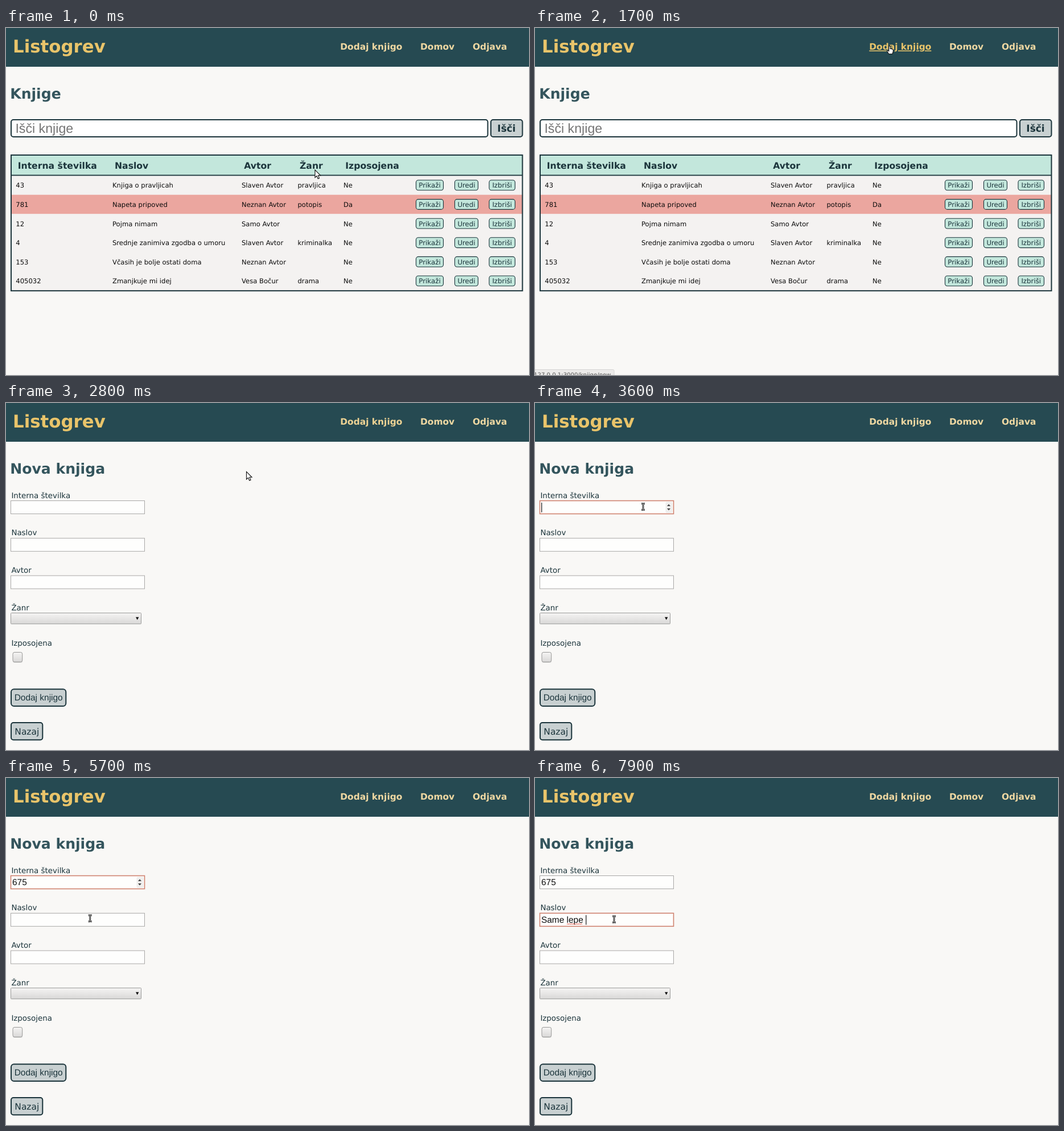
Recreate the animation shown at these times as an HTML page. Size 919 by 609 pixels, loop 8 s.

```html
<!DOCTYPE html>
<html lang="sl">
<head>
<meta charset="utf-8">
<title>Knjige</title>
<style>
  html, body { margin: 0; width: 100%; height: 100%; overflow: hidden; background: #f9f8f6; }
  svg { display: block; }
  text { font-family: "DejaVu Sans", sans-serif; fill: #1b343b; white-space: pre; text-rendering: geometricPrecision; }
  .bold { font-weight: bold; }
  .sans { font-family: "Liberation Sans", Arial, sans-serif; }
  .mid { text-anchor: middle; }
</style>
</head>
<body>
<svg id="stage" width="919" height="609" viewBox="0 0 919 609">
  <defs>
    <linearGradient id="grey" x2="0" y2="1">
      <stop stop-color="#f5f4f3"/><stop offset="1" stop-color="#d9d8d7"/>
    </linearGradient>
  </defs>
</svg>
<script>
const INK = '#1b343b', MINT = '#c3e7dc', STEEL = '#c8d0d1';
const LOOP = 8000, STEP = 100;

const text = (x, y, size, str, attrs = '') =>
  `<text x="${x}" y="${y}" font-size="${size}" ${attrs}>${str}</text>`;
const rect = (x, y, x2, y2, attrs) =>
  `<rect x="${x}" y="${y}" width="${x2 - x}" height="${y2 - y}" ${attrs}/>`;
const framed = (fill, width = 2, r = 4) =>
  `fill="${fill}" stroke="${INK}" stroke-width="${width}" rx="${r}"`;

const banner = () =>
  rect(0, 0, 919, 68, 'fill="#264a52"') +
  text(12, 43, 30.85, 'Listogrev', 'class="bold" style="fill:#e9c46a"') +
  [[587.3, 'Dodaj knjigo', 'id="link"'], [728, 'Domov'], [820, 'Odjava']].map(([x, s, id = '']) =>
    text(x, 38.4, 15.45, s, `class="bold" style="fill:#efd8a2" ${id}`)).join('');

const books = [
  ['43', 'Knjiga o pravljicah', 'Slaven Avtor', 'pravljica', 'Ne'],
  ['781', 'Napeta pripoved', 'Neznan Avtor', 'potopis', 'Da'],
  ['12', 'Pojma nimam', 'Samo Avtor', '', 'Ne'],
  ['4', 'Srednje zanimiva zgodba o umoru', 'Slaven Avtor', 'kriminalka', 'Ne'],
  ['153', 'Včasih je bolje ostati doma', 'Neznan Avtor', '', 'Ne'],
  ['405032', 'Zmanjkuje mi idej', 'Vesa Bočur', 'drama', 'Ne']
];
const columns = [17.3, 187, 414, 512.5, 593];
const headings = [[20.7, 'Interna številka'], [191, 'Naslov'], [418.3, 'Avtor'], [516, 'Žanr'], [596.3, 'Izposojena']];
const actions = [[720.5, 768.5, 'Prikaži'], [788.5, 829.5, 'Uredi'], [849, 894.5, 'Izbriši']];

const bookRow = (cells, i) => {
  const y = 280.3 + 33.6 * i;
  return cells.map((s, c) => text(columns[c], y, 11.6, s, 'style="fill:#0c0c0c"')).join('') +
    actions.map(([x, x2, s]) => rect(x, y - 13.3, x2, y + 4.5, framed(MINT, 1.1)) +
      text((x + x2) / 2, y, 11.8, s, 'class="mid"')).join('');
};

const listPage = () =>
  text(7.2, 124.4, 25.1, 'Knjige', 'class="bold" style="fill:#34555d"') +
  rect(9, 161, 846.5, 191, framed('#fff')) +
  text(16.4, 184, 23.2, 'Išči knjige', 'class="sans" style="fill:#757575"') +
  rect(852, 161, 907.5, 191, framed(STEEL)) +
  text(879.5, 182.3, 17, 'Išči', 'class="bold mid"') +
  rect(9, 223, 907.5, 461, `fill="#f4f2f1"`) +
  rect(9, 223, 907.5, 258, `fill="${MINT}"`) +
  rect(9, 292.7, 907.5, 326.2, 'fill="#eba69f"') +
  rect(9, 257.6, 907.5, 259.4, `fill="${INK}"`) +
  rect(9, 223, 907.5, 461.2, framed('none', 2, 0)) +
  headings.map(([x, s]) => text(x, 247, 15.65, s, 'class="bold"')).join('') +
  books.map(bookRow).join('');

const field = (id, y) => rect(8.5, y, 243.5, y + 23, `id="${id}" fill="#fefefd"`);

const formPage = () =>
  text(7.2, 124.4, 25.1, 'Nova knjiga', 'class="bold" style="fill:#34555d"') +
  [[166.5, 'Interna številka'], [232.2, 'Naslov'], [298, 'Avtor'], [363.8, 'Žanr'], [425.8, 'Izposojena']]
    .map(([y, s]) => text(9.4, y, 13.4, s)).join('') +
  field('number', 171.5) + field('title', 237.3) + field('author', 303) +
  `<g id="spinner">${rect(229.5, 173.5, 241.5, 193, 'fill="#f0efee" rx="2"')}
    <path d="M232 181l3-3.4 3 3.4zM232 185l3 3.4 3-3.4z" fill="#444"/></g>` +
  text(11, 188.3, 15.43, '', 'id="numberText" class="sans" style="fill:#111"') +
  text(11, 254, 15.43, '', 'id="titleText" class="sans" style="fill:#111"') +
  `<path id="squiggle" d="M56 257${'l1.5-1.5 1.5 1.5'.repeat(9)}" fill="none" stroke="#e0402f"/>` +
  rect(0, 0, 1.1, 17, 'id="caret"') +
  rect(8.5, 368.5, 237.5, 387.7, 'fill="url(#grey)" stroke="#9b9b9a" rx="1"') +
  '<path d="M228 375.8h5.4l-2.7 5z" fill="#111"/>' +
  rect(12, 438.5, 29, 456, 'fill="#dcdbda" rx="3"') +
  rect(12, 437.5, 28.7, 454.5, 'fill="url(#grey)" stroke="#989897" rx="3"') +
  rect(9, 502.2, 105.3, 532, framed(STEEL, 2, 5)) +
  text(57.2, 522, 15.45, 'Dodaj knjigo', 'class="sans mid"') +
  rect(9, 561, 64.3, 591.3, framed(STEEL)) +
  text(36.8, 582.3, 15.45, 'Nazaj', 'class="mid"');

const cursors = {
  arrow: '<path d="M0 0V13.5L3 10.7 5.2 15.6 7.5 14.6 5.4 9.8H9.6Z" fill="#fff" stroke="#111" stroke-width="1.1"/>',
  hand: `<path d="M-1.2 .6Q0-.8 1.2 .6V5Q5.8 5 6.3 7V10L5 14H-1.4L-4.2 9.4Q-4.6 7.4-2.6 8.2L-1.2 9.4Z"
    fill="#fff" stroke="#111" stroke-width="1.1" stroke-linejoin="round"/>`,
  beam: ['#222" stroke-width="2.8', '#ddd" stroke-width=".8'].map(s =>
    `<path d="M-3-5.5Q0-5.5 0-4Q0-5.5 3-5.5M0-4V4M-3 5.5Q0 5.5 0 4Q0 5.5 3 5.5" fill="none" stroke="${s}"/>`).join('')
};

const stage = document.getElementById('stage');
stage.insertAdjacentHTML('beforeend',
  banner() +
  `<g id="list">${listPage()}</g><g id="form">${formPage()}</g>` +
  `<g id="status">${rect(-5, 599.5, 139, 615, 'fill="#ecebea" stroke="#d6d5d4" rx="2"')}
    ${text(133.5, 612, 10.1, '127.0.0.1:3000/knjige/new', 'text-anchor="end" style="fill:#555"')}</g>` +
  Object.entries(cursors).map(([id, shape]) => `<g id="${id}">${shape}</g>`).join(''));

const el = id => document.getElementById(id);
const show = (id, on) => el(id).style.display = on ? '' : 'none';
const clamp = v => Math.max(0, Math.min(1, v));

// Pointer waypoints: time, x, y
const path = [
  [0, 543, 249], [300, 543, 249], [500, 543, 242], [600, 543, 241], [900, 596, 121], [1000, 596, 121],
  [1400, 622, 34], [1700, 623, 31.5], [2400, 623, 31.5], [2700, 500, 100], [3100, 190, 182],
  [5000, 190, 182], [5100, 195, 190], [5200, 196, 212], [5300, 174, 241], [5400, 174, 241],
  [5800, 139, 248], [LOOP, 139, 248]
];
function pointer(t) {
  const i = path.findIndex(p => p[0] > t);
  const [t0, x0, y0] = path[i - 1], [t1, x1, y1] = path[i];
  const k = (t - t0) / (t1 - t0);
  return [x0 + (x1 - x0) * k, y0 + (y1 - y0) * k];
}

function hoverAmount(t) {
  if (t < 2100) return clamp((t - 1300) / 400);
  if (t < 2600) return clamp((t - 2020) / 250);
  return clamp(1 - (t - 2500) / 400);
}

function styleField(id, focused) {
  el(id).setAttribute('stroke', focused ? '#cf8270' : '#a9a8a7');
  el(id).setAttribute('stroke-width', focused ? 1.6 : 1);
}

function draw(t) {
  const onForm = t >= 2100;
  show('list', !onForm);
  show('form', onForm);

  const hovered = t >= 1400 && t < 2600;
  const h = hoverAmount(t);
  const mix = (a, b) => Math.round(a + (b - a) * h);
  el('link').style.fill = `rgb(${mix(239, 233)},${mix(216, 196)},${mix(162, 106)})`;
  el('link').style.textDecoration = hovered ? 'underline' : 'none';
  show('status', t >= 1500 && t < 2700);

  const [x, y] = pointer(t);
  const inNumber = onForm && x < 244 && y > 171 && y < 195;
  const inTitle = onForm && x < 244 && y > 237 && y < 261;
  const kind = hovered ? 'hand' : inNumber || inTitle ? 'beam' : 'arrow';
  for (const id in cursors) show(id, id === kind);
  el(kind).setAttribute('transform', `translate(${x} ${y})`);

  const focus = t < 3600 ? '' : t < 6000 ? 'number' : 'title';
  ['number', 'title', 'author'].forEach(id => styleField(id, id === focus));
  show('spinner', inNumber || focus === 'number');

  const digits = t < 4500 ? 0 : Math.floor((t - 4200) / 300);
  const letters = t < 6900 ? 0 : t < 7100 ? 1 : 2 + (t - 7100) / STEP;
  el('numberText').textContent = '675'.slice(0, digits);
  el('titleText').textContent = 'Same lepe '.slice(0, letters);
  show('squiggle', letters >= 10);

  const blinkedOff = [[4200, 4500], [5700, 6000], [6600, 6900]].some(([a, b]) => t >= a && t < b);
  show('caret', focus && !blinkedOff);
  if (focus) {
    const typed = el(focus + 'Text');
    const width = typed.textContent ? typed.getComputedTextLength() : 0;
    el('caret').setAttribute('x', 11.2 + width);
    el('caret').setAttribute('y', focus === 'number' ? 174.8 : 240.6);
  }
}

const start = performance.now();
function tick() {
  const t = (performance.now() - start) % LOOP;
  draw(Math.floor(t / STEP) * STEP);
  requestAnimationFrame(tick);
}
tick();
</script>
</body>
</html>
```
